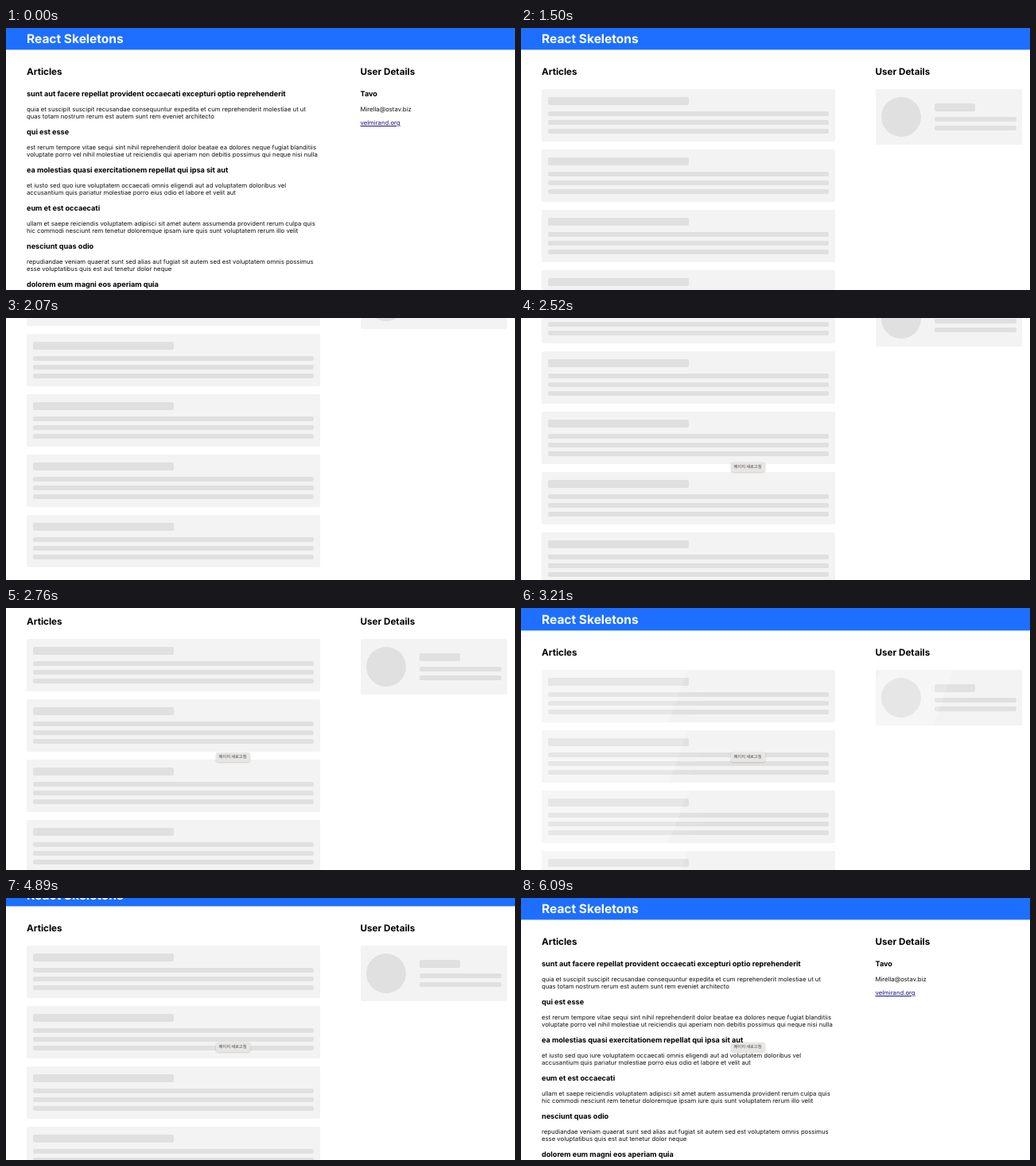
These frames come from a looping animation (640x330 px, 6390 ms). An HTML page:

```html
<!DOCTYPE html>
<html lang="en">
<head>
<meta charset="utf-8">
<title>React Skeletons</title>
<style>
  html, body { margin: 0; width: 100%; height: 100%; overflow: hidden; background: #fff; }
  #stage { position: relative; width: 640px; height: 330px; overflow: hidden;
    font: 7.72px/20px Inter, "Open Sans", sans-serif; color: #111; text-rendering: geometricPrecision; }
  #page, #page div { position: absolute; }
  #page { left: 0; top: 0; width: 640px; }
  #page .header { left: 0; top: -40px; width: 640px; height: 67px; background: #1e6fff; border-bottom: 1px solid #a5c6ff; }
  .text { white-space: pre; }
  .h1 { font-size: 15.5px; font-weight: 700; color: #fff; }
  .h2 { font-size: 11.65px; font-weight: 700; color: #000; }
  .h3 { font-size: 9.12px; font-weight: 700; color: #000; }
  .link { color: #1c1680; text-decoration: underline; }
  .card { background: #f3f3f3; border-radius: 2px; overflow: hidden; }
  .bar { background: #e0e0e0; border-radius: 2px; }
  .shimmer { top: 0; width: 50%; height: 100%; background: rgba(255,255,255,.2);
    box-shadow: 0 0 30px 30px rgba(255,255,255,.05); transform: skewX(-20deg); }
  #tip { position: absolute; left: 263.5px; top: 182px; width: 43px; height: 11.5px;
    background: #e8e6e5; border-radius: 3px; box-shadow: 0 .5px 2px rgba(0,0,0,.22);
    font: 5.25px/10.5px "Noto Sans CJK KR", "Noto Sans CJK", sans-serif; text-align: center; color: #444; white-space: pre; }
</style>
</head>
<body>
<div id="stage">
  <div id="page">
    <div class="header"></div>
    <div id="loading"></div>
    <div id="content"></div>
  </div>
  <div id="tip">페이지 새로고침</div>
</div>
<script>
const LOOP = 6390, RELOAD = 690, LOADED = 5610, TIP = 2400;
const $ = id => document.getElementById(id);
const page = $('page'), loading = $('loading'), content = $('content'), tip = $('tip');

function add(parent, cls, x, y, w, h, radius) {
  const el = document.createElement('div');
  el.className = cls;
  Object.assign(el.style, { left: x + 'px', top: y + 'px', width: w + 'px', height: h + 'px' });
  if (radius) el.style.borderRadius = radius + 'px';
  parent.append(el);
  return el;
}

// y is the vertical middle of the capitals
function label(parent, cls, x, y, text) {
  const span = document.createElement('span');
  span.textContent = text;
  add(parent, 'text ' + cls, x, y - 10, 400, 20).append(span);
}

label(page, 'h1', 26, 13.6, 'React Skeletons');
label(page, 'h2', 26, 55, 'Articles');
label(page, 'h2', 445.5, 55, 'User Details');

const articles = [
  ['sunt aut facere repellat provident occaecati excepturi optio reprehenderit',
   'quia et suscipit suscipit recusandae consequuntur expedita et cum reprehenderit molestiae ut ut',
   'quas totam nostrum rerum est autem sunt rem eveniet architecto'],
  ['qui est esse',
   'est rerum tempore vitae sequi sint nihil reprehenderit dolor beatae ea dolores neque fugiat blanditiis',
   'voluptate porro vel nihil molestiae ut reiciendis qui aperiam non debitis possimus qui neque nisi nulla'],
  ['ea molestias quasi exercitationem repellat qui ipsa sit aut',
   'et iusto sed quo iure voluptatem occaecati omnis eligendi aut ad voluptatem doloribus vel',
   'accusantium quis pariatur molestiae porro eius odio et labore et velit aut'],
  ['eum et est occaecati',
   'ullam et saepe reiciendis voluptatem adipisci sit amet autem assumenda provident rerum culpa quis',
   'hic commodi nesciunt rem tenetur doloremque ipsam iure quis sunt voluptatem rerum illo velit'],
  ['nesciunt quas odio',
   'repudiandae veniam quaerat sunt sed alias aut fugiat sit autem sed est voluptatem omnis possimus',
   'esse voluptatibus quis est aut tenetur dolor neque'],
  ['dolorem eum magni eos aperiam quia']
];
articles.forEach(([title, ...lines], i) => {
  const y = 83.8 + 48 * i;
  label(content, 'h3', 26, y, title);
  lines.forEach((line, k) => label(content, '', 26, y + 19.2 + 9.2 * k, line));
});
label(content, 'h3', 445.5, 83.8, 'Tavo');
label(content, '', 445.5, 103, 'Mirella@ostav.biz');
label(content, 'link', 445.5, 120, 'velmirand.org');

function addCard(x, y, w, h, bars) {
  const card = add(loading, 'card', x, y, w, h);
  for (const bar of bars) add(card, 'bar', ...bar);
  const shimmer = document.createElement('div');
  shimmer.className = 'shimmer';
  card.append(shimmer);
}
const lines = (x, w, ...tops) => tops.map(y => [x, y, w, 6, 2.5]);

for (let i = 0; i < 5; i++)
  addCard(26.3, 77 + 76 * i, 368.7, 66, [[7.5, 10, 177, 10], ...lines(7.5, 353.7, 28, 39, 50)]);
addCard(445.5, 77, 184.5, 70,
  [[7.3, 10, 50.4, 50.4, 26], [74, 17.7, 51.7, 10], ...lines(74, 103, 35, 46)]);
const shimmers = document.querySelectorAll('.shimmer');

// Smooth curve through [time, value] points, flat at every turn
function curve(points, t) {
  const last = points.length - 1;
  if (t <= points[0][0]) return points[0][1];
  if (t >= points[last][0]) return points[last][1];
  const i = points.findIndex(p => p[0] > t) - 1;
  const rate = k => (points[k + 1][1] - points[k][1]) / (points[k + 1][0] - points[k][0]);
  const slope = k => {
    if (k === 0 || k === last || rate(k - 1) * rate(k) <= 0) return 0;
    return 2 * rate(k - 1) * rate(k) / (rate(k - 1) + rate(k));
  };
  const [t0, a] = points[i], [t1, b] = points[i + 1];
  const d = t1 - t0, p = (t - t0) / d, q = 1 - p;
  return a + (b - a) * p * p * (3 - 2 * p) + d * p * q * (slope(i) * q - slope(i + 1) * p);
}

const scroll = [
  [1560, 0], [1800, 60], [1950, 115], [2070, 133], [2250, 135], [2430, 128], [2580, 95],
  [2760, 38], [2940, 9], [3090, -1], [3240, -1], [3390, 0],
  [3990, 0], [4170, 55], [4380, 10], [4530, 0],
  [4650, 0], [4770, 45], [4980, 0]
];
const sweep = [[0, -150], [1250, -60], [2500, 150]];

function draw() {
  const t = performance.now() % LOOP;
  const busy = t >= RELOAD && t < LOADED;
  loading.style.display = busy ? '' : 'none';
  content.style.display = busy ? 'none' : '';
  tip.style.display = t >= TIP ? '' : 'none';
  page.style.transform = `translateY(${-Math.round(curve(scroll, t))}px)`;
  const x = curve(sweep, (t + 880) % 2500);
  for (const s of shimmers) s.style.left = x + '%';
  requestAnimationFrame(draw);
}
draw();
</script>
</body>
</html>
```
